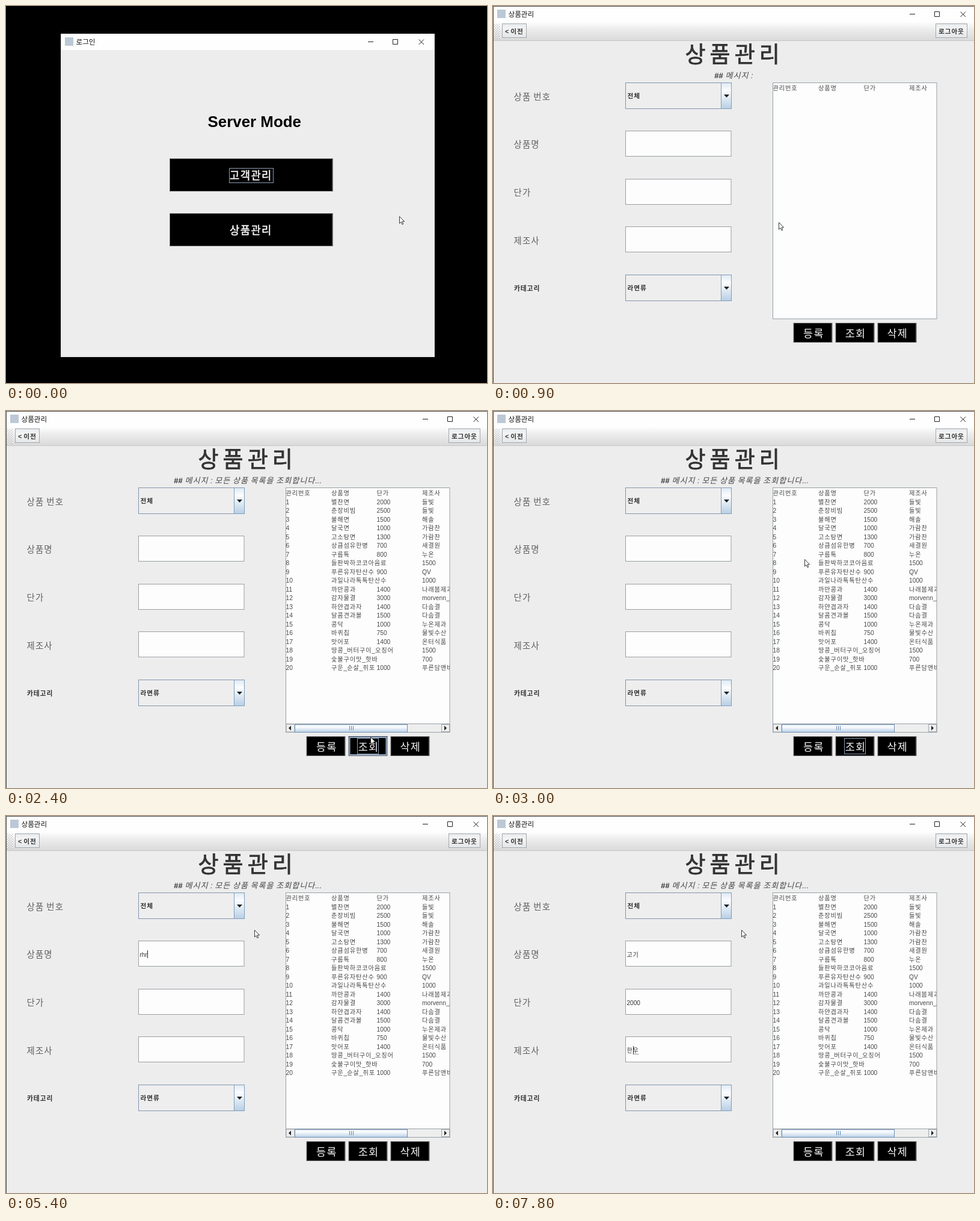
Write an HTML page that moves like this. It is 800 px wide and 626 px high and loops after 8000 ms.

```html
<!DOCTYPE html>
<html lang="ko">
<head>
<meta charset="utf-8">
<title>상품관리</title>
<style>
  html, body { margin: 0; width: 100%; height: 100%; overflow: hidden; background: #000; }
  svg { display: block; width: 100vw; height: 100vh; }
  text { font-family: "Liberation Sans", Arial, sans-serif; white-space: pre; }
  .k { font-family: "Noto Sans CJK KR", "Noto Sans CJK", sans-serif; letter-spacing: .08em; }
  .ui .k { letter-spacing: 0; }
  .head .k { letter-spacing: .19em; }
</style>
</head>
<body>
<svg id="stage" viewBox="0 0 800 626" xmlns="http://www.w3.org/2000/svg">
  <defs>
    <linearGradient id="bar" x2="0" y2="1">
      <stop offset="0" stop-color="#fdfdfd"/><stop offset=".4" stop-color="#ececec"/><stop offset="1" stop-color="#dadada"/>
    </linearGradient>
    <linearGradient id="blue" x2="0" y2="1">
      <stop offset="0" stop-color="#dfe9f3"/><stop offset=".3" stop-color="#fbfdff"/><stop offset="1" stop-color="#b8cfe5"/>
    </linearGradient>
    <linearGradient id="face" x2="0" y2="1">
      <stop offset="0" stop-color="#e8ebee"/><stop offset=".35" stop-color="#f4f4f4"/><stop offset="1" stop-color="#e4e6e8"/>
    </linearGradient>
    <pattern id="bumps" width="4" height="4" patternUnits="userSpaceOnUse">
      <path d="M0 0h1v1h-1zM2 2h1v1h-1z" fill="#999"/><path d="M1 1h1v1h-1zM3 3h1v1h-1z" fill="#fff"/>
    </pattern>
    <clipPath id="listClip"><path d="M465 128h273v392h-273z"/></clipPath>
  </defs>
</svg>
<script>
const NS = "http://www.w3.org/2000/svg";
const LOOP = 8000, STEP = 300;
const stage = document.getElementById("stage");

function add(parent, tag, attrs = {}) {
  const el = document.createElementNS(NS, tag);
  for (const key in attrs) el.setAttribute(key, attrs[key]);
  parent.appendChild(el);
  return el;
}
const group = (parent, attrs) => add(parent, "g", attrs);
const rect = (p, x, y, width, height, fill, attrs) => add(p, "rect", { x, y, width, height, fill, ...attrs });
const line = (p, d, stroke, attrs) => add(p, "path", { d, stroke, fill: "none", ...attrs });
const box = (p, x, y, w, h, fill, stroke) => rect(p, x + .5, y + .5, w - 1, h - 1, fill, { stroke });
const show = (el, on) => el.setAttribute("display", on ? "inline" : "none");

// Hangul runs get full-width spacing, everything else stays proportional.
function setText(el, str) {
  el.textContent = "";
  for (const run of str.match(/[ㄱ-ㅎ가-힣]+|[^ㄱ-ㅎ가-힣]+/g) || []) {
    const span = add(el, "tspan", /[ㄱ-ㅎ가-힣]/.test(run) ? { class: "k" } : {});
    span.textContent = run;
  }
}
function text(p, x, y, size, str, attrs) {
  const el = add(p, "text", { x, y, "font-size": size, fill: "#333", ...attrs });
  setText(el, str);
  return el;
}

function titleBar(p, x, y, w, title) {
  rect(p, x, y, w, 27, "#fefefe");
  rect(p, x + 7, y + 6, 14, 14, "#bcc8d5");
  text(p, x + 25.5, y + 17.5, 11.6, title, { class: "ui", fill: "#111" });
  const r = x + w, m = y + 13;
  line(p, `M${r - 111} ${m + .5}h9M${r - 69.5} ${m - 3.5}h8v8h-8zM${r - 26.5} ${m - 3.5}l8.5 8.5m0 -8.5l-8.5 8.5`, "#222");
}

// bold is the extra outline that thickens the label
function blackButton(p, x, y, w, h, label, tx, ty, size, bold) {
  const body = group(p);
  box(body, x, y, w, h, "#000", "#777");
  line(body, `M${x + w - 1.5} ${y + 1}v${h - 2}`, "#444");
  const hover = group(body);
  rect(hover, x + 2, y + 2, w - 4, h - 4, "none", { stroke: "#93a9c4", "stroke-width": 2 });
  line(hover, `M${x} ${y + .5}h${w}`, "#333f4f");
  text(body, tx, ty, size, label, { fill: "#f6f6f6", stroke: "#f6f6f6", "stroke-width": bold });
  show(hover, false);
  return { body, hover };
}
const ring = (p, x, y, w, h) => box(p, x, y, w, h, "none", "#8b9eb5");

// Start window
const login = group(stage);
rect(login, 0, 0, 800, 626, "#000");
rect(login, 91, 46, 622, 537, "#ededed");
titleBar(login, 91, 46, 622, "로그인");
line(login, "M91.5 46v536.5h621v-536.5", "#d5d5d5", { "stroke-width": .6 });
text(login, 335.5, 200.5, 25.9, "Server Mode", { "font-weight": 700, fill: "#000" });
const customer = blackButton(login, 272, 253, 272, 55, "고객관리", 372, 288, 17.7, .5);
const goods = blackButton(login, 272, 344, 272, 55, "상품관리", 372, 378.5, 17.7, .5);
ring(customer.body, 371, 269, 74, 25);

// Goods window, slightly wider than the stage
const admin = group(stage);
rect(admin, 0, 0, 800, 626, "#ededed");
titleBar(admin, 0, 0, 804, "상품관리");
rect(admin, 0, 27, 800, 30, "url(#bar)");
line(admin, "M0 57.5h800", "#c6c6c6");
rect(admin, 2, 29, 10, 26, "url(#bumps)");
line(admin, "M.5 626V.5H800", "#4a4a4a");

function toolButton(x, w, label, tx) {
  box(admin, x, 29, w, 24, "url(#face)", "#a2a8ae");
  text(admin, tx, 46, 10.7, label, { "font-weight": 700 });
}
toolButton(15, 41, "< 이전", 20);
toolButton(736, 53, "로그아웃", 741);
const backFocus = ring(admin, 18, 33, 35, 16);

text(admin, 319.5, 93.5, 37, "상품관리", { class: "head", stroke: "#333", "stroke-width": .8 });
function message(x, str) {
  const g = group(admin, { "font-style": "italic" });
  text(g, x, 119.5, 13, "##", { "font-weight": 700 });
  text(g, x + 18.5, 119.5, 13, str, { fill: "#444" });
  return g;
}
const idleMsg = message(368, "메시지 : ");
const listMsg = message(279, "메시지 : 모든 상품 목록을 조회합니다...");

["상품 번호", "상품명", "단가", "제조사"].forEach((label, i) =>
  text(admin, 34.5, 155.5 + i * 79.8, 14.4, label, { fill: "#606060" }));
text(admin, 35, 472.5, 10.8, "카테고리", { "font-weight": 700 });

function combo(y, value) {
  box(admin, 220, y, 177, 44, "#eee", "#8296ab");
  box(admin, 379, y, 18, 44, "url(#blue)", "#7f9db9");
  add(admin, "path", { d: `M384 ${y + 20}h9l-4.5 5z`, fill: "#222" });
  text(admin, 223.5, y + 25.5, 10.7, value, { "font-weight": 700 });
}
combo(127, "전체");
combo(446, "라면류");

const fields = [207, 287, 366].map(y => {
  box(admin, 220, y, 176.5, 43, "#fdfdfd", "#9a9fa5");
  return text(admin, 222.5, y + 27, 10.1, "");
});
const caret = rect(admin, 0, 0, 1, 13, "#222");
const compose = line(admin, "M233 395.5h10", "#444", { "stroke-dasharray": "1 1" });

// Product list
const goodsList = `별찬면|2000|들빛
춘장비빔|2500|들빛
불해면|1500|해솔
달국면|1000|가람찬
고소탕면|1300|가람찬
상큼섬유한병|700|새결원
구름톡|800|누온
들판박하코코아음료|1500|누온
푸른유자탄산수|900|QV
과일나라톡톡탄산수|1000|누온
까만콩과|1400|나래봄제과
감자물결|3000|morvenn_A
하얀겹과자|1400|다솜결
달콤견과볼|1500|다솜결
콩닥|1000|누온제과
바퀴칩|750|물빛수산
맛어포|1400|온터식품
땅콩_버터구이_오징어|1500|온터식품
숯불구이맛_핫바|700|물빛수산
구운_순살_쥐포|1000|푸른담앤비`.split("\n").map(row => row.split("|"));

const TABS = [465.5, 541, 616.5, 692];
const listBox = box(admin, 465, 127, 273.5, 393, "#fdfdfd", "#9aa0a6");
const listText = group(admin, { "clip-path": "url(#listClip)" });
function listRow(parent, i, cells) {
  let tab = 0;
  for (const cell of cells) {
    text(parent, TABS[tab], 140 + i * 14.5, 10.25, cell, { fill: "#484848" });
    const ems = [...cell].reduce((sum, c) => sum + (c > "ㄱ" ? 1 : .556), 0);
    tab += ems > 7.35 ? 2 : 1;
    if (tab >= TABS.length) break;
  }
}
listRow(listText, 0, ["관리번호", "상품명", "단가", "제조사"]);
const results = group(listText);
goodsList.forEach((row, i) => listRow(results, i + 1, [String(i + 1), ...row]));

const scroll = group(admin);
box(scroll, 465, 519, 273.5, 15, "#eee", "#9aa0a6");
box(scroll, 466, 520, 14, 13, "#eee", "#c5c9cd");
box(scroll, 724, 520, 14, 13, "#eee", "#a3a9af");
box(scroll, 480, 520, 188, 14, "url(#blue)", "#6f8fb3");
add(scroll, "path", { d: "M470 526.5l4 -4v8zM733 526.5l-4 -4v8z", fill: "#222" });
line(scroll, "M571.5 523v7M574.5 523v7M577.5 523v7", "#6484aa");

const actions = group(admin);
const [, search] = ["등록", "조회", "삭제"].map((label, i) =>
  blackButton(actions, 499.5 + i * 70, 526, 65, 33, label, 516 + i * 69.7, 549.5, 17.4, 0));
const searchFocus = ring(search.body, 584, 529, 36, 27);

const cursor = add(stage, "path", {
  d: "M.5 .5V12l2.7-2.5 1.8 4.2 1.8-.8L5 8.8h3.6z", fill: "#fff", stroke: "#222", "stroke-width": .9
});

// Pointer stops: time, x, y
const path = [
  [0, 654, 349], [300, 590, 352], [600, 477, 356], [900, 475, 359], [1200, 477, 361],
  [2100, 606, 539], [2400, 606, 541], [3000, 518, 246], [3600, 560, 330],
  [4200, 720, 440], [4800, 372, 224], [5100, 413, 189], [LOOP, 413, 189]
];
function pointer(t) {
  const i = path.findIndex(p => p[0] > t);
  const [a, b] = [path[i - 1], path[i]];
  const u = (t - a[0]) / (b[0] - a[0]);
  const k = u * u * (3 - 2 * u);
  return [a[1] + (b[1] - a[1]) * k, a[2] + (b[2] - a[2]) * k];
}

// Typing: time, field values, caret x, active field
const typing = [
  [0, "", "", "", 0, -1], [4800, "", "", "", 223, 0], [5100, "r", "", "", 226, 0],
  [5400, "rhr", "", "", 235, 0], [5700, "rhrl", "", "", 237, 0], [6000, "", "", "", 223, 0],
  [6300, "고", "", "", 233, 0], [6600, "고기", "", "", 243, 0], [6900, "고기", "2", "", 228, 1],
  [7200, "고기", "2000", "", 245, 1], [7500, "고기", "2000", "하", 223, 2], [7800, "고기", "2000", "한우", 233, 2]
];
let typed = null;
function type(t) {
  const state = typing.filter(s => s[0] <= t).pop();
  if (state === typed) return;
  typed = state;
  fields.forEach((el, i) => setText(el, state[i + 1]));
  const active = state[5];
  show(caret, active >= 0);
  caret.setAttribute("x", state[4]);
  caret.setAttribute("y", [223, 303, 382][Math.max(active, 0)]);
  show(compose, t >= 7800);
}

function draw(ms) {
  const t = Math.floor(ms % LOOP / STEP) * STEP;
  const listed = t >= 2400;
  show(login, t < 900);
  show(admin, t >= 900);
  show(goods.hover, t === 600);
  show(backFocus, t >= 1200 && !listed);
  show(idleMsg, !listed);
  show(listMsg, listed);
  show(results, listed);
  show(scroll, listed);
  listBox.setAttribute("height", listed ? 406 : 392);
  actions.setAttribute("transform", `translate(0 ${listed ? 14 : 0})`);
  show(search.hover, t === 2100 || t === 2400);
  show(searchFocus, listed && t < 4800);
  type(t);
  cursor.setAttribute("transform", `translate(${pointer(t)})`);
}

const start = performance.now();
function tick() {
  draw(performance.now() - start);
  requestAnimationFrame(tick);
}
draw(0);
tick();
</script>
</body>
</html>
```
